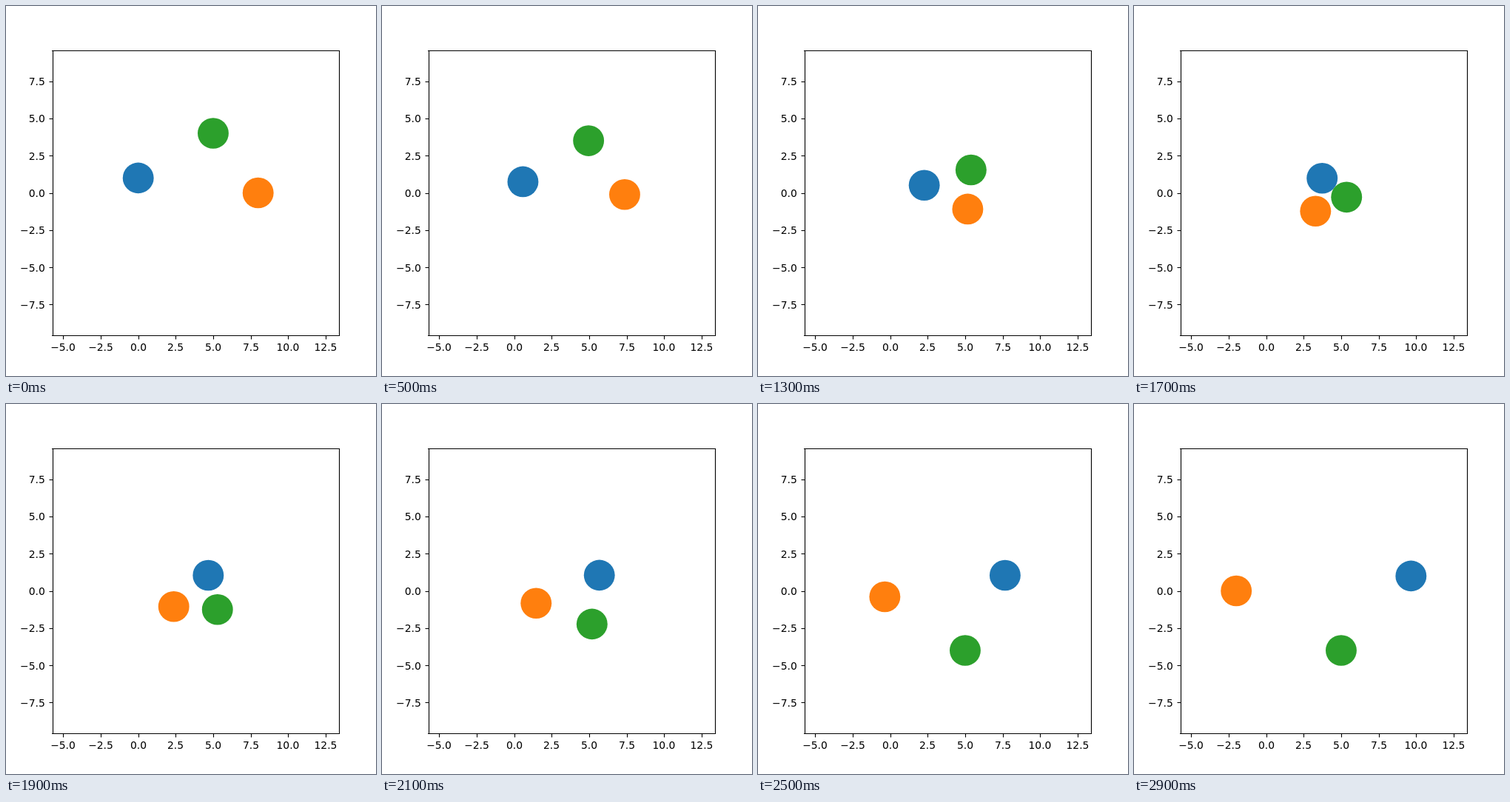
Recreate the animation shown at these times as an HTML page. Size 500 by 500 pixels, loop 3100 ms.

```html
<!DOCTYPE html>
<html lang="en">
<head>
<meta charset="utf-8">
<title>Three discs trading places</title>
<style>
  html, body { margin: 0; width: 100%; height: 100%; overflow: hidden; background: #fff; }
  svg { display: block; width: 500px; height: 500px; }
  text { font: 13.89px "DejaVu Sans", sans-serif; }
  .line { fill: none; stroke: #000; stroke-width: 1.11; }
</style>
</head>
<body>
<svg viewBox="0 0 500 500">
  <g id="discs"></g>
  <g id="axes">
    <path class="line" d="M62 60.5H451M62 445.5H451M63.5 60V446M450.5 60V446"/>
  </g>
</svg>
<script>
const LOOP = 3100, FIRST = 500, STEP = 200;

// Each path runs smoothly through [step, x, y] and rests at its last point
const discs = [
  { color: '#1f77b4', path: [[0, 0, 1], [1, 0.58, 0.75], [3, 1.41, 0.39], [5, 2.27, 0.51],
    [7, 3.73, 0.98], [9, 5.68, 1.05], [13, 9.66, 1]] },
  { color: '#ff7f0e', path: [[0, 8, 0], [1, 7.37, -0.11], [3, 6.46, -0.36], [4, 6.02, -0.71],
    [5, 5.17, -1.09], [6, 4.23, -1.3], [7, 3.29, -1.23], [9, 1.46, -0.83], [12.8, -2, 0]] },
  { color: '#2ca02c', path: [[0, 5, 4], [1, 4.96, 3.5], [3, 4.9, 2.64], [5, 5.39, 1.54],
    [7, 5.36, -0.29], [9, 5.19, -2.23], [10.83, 5, -4]] }
];

const px = x => 178.7 + 20.25 * x;
const py = y => 252.5 - 20.125 * y;

function add(parent, tag, attrs, text = '') {
  const el = document.createElementNS('http://www.w3.org/2000/svg', tag);
  for (const key in attrs) el.setAttribute(key, attrs[key]);
  el.textContent = text;
  return parent.appendChild(el);
}

const axes = document.getElementById('axes');
const label = v => v.toFixed(1).replace('-', '\u2212');

for (let v = -5; v <= 12.5; v += 2.5) {
  const x = Math.round(px(v));
  add(axes, 'path', { class: 'line', d: `M${x + 0.5} 445.5v5` });
  add(axes, 'text', { x, y: 466, 'text-anchor': 'middle' }, label(v));
}
for (let v = -7.5; v <= 7.5; v += 2.5) {
  const y = py(v);
  add(axes, 'path', { class: 'line', d: `M63.5 ${Math.round(y) + 0.5}h-5` });
  add(axes, 'text', { x: 52.8, y: Math.round(y + 5.4), 'text-anchor': 'end' }, label(v));
}

// Cubic Hermite curve; c picks the coordinate
const slope = (p, i, c) => (p[i + 1][c] - p[i][c]) / (p[i + 1][0] - p[i][0]);

function tangent(p, i, c) {
  if (i === 0) return slope(p, 0, c);
  if (i === p.length - 1) return slope(p, i - 1, c);
  const before = p[i][0] - p[i - 1][0], after = p[i + 1][0] - p[i][0];
  return (slope(p, i - 1, c) * after + slope(p, i, c) * before) / (before + after);
}

function along(p, step, c) {
  const last = p.length - 1;
  const s = Math.min(step, p[last][0]);
  let i = 0;
  while (i < last - 1 && s > p[i + 1][0]) i++;
  const h = p[i + 1][0] - p[i][0];
  const u = (s - p[i][0]) / h, w = 1 - u;
  return p[i][c] * w * w * (1 + 2 * u) + p[i + 1][c] * u * u * (3 - 2 * u)
    + h * u * w * (tangent(p, i, c) * w - tangent(p, i + 1, c) * u);
}

const group = document.getElementById('discs');
for (const d of discs) d.el = add(group, 'ellipse', { rx: 20.95, ry: 20.82, fill: d.color });

function draw(time) {
  const t = time % LOOP;
  const step = t < FIRST ? 0 : 1 + Math.floor((t - FIRST) / STEP);
  for (const { el, path } of discs) {
    el.setAttribute('cx', px(along(path, step, 1)));
    el.setAttribute('cy', py(along(path, step, 2)));
  }
}

const start = performance.now();
function tick() {
  draw(performance.now() - start);
  requestAnimationFrame(tick);
}
tick();
</script>
</body>
</html>
```
